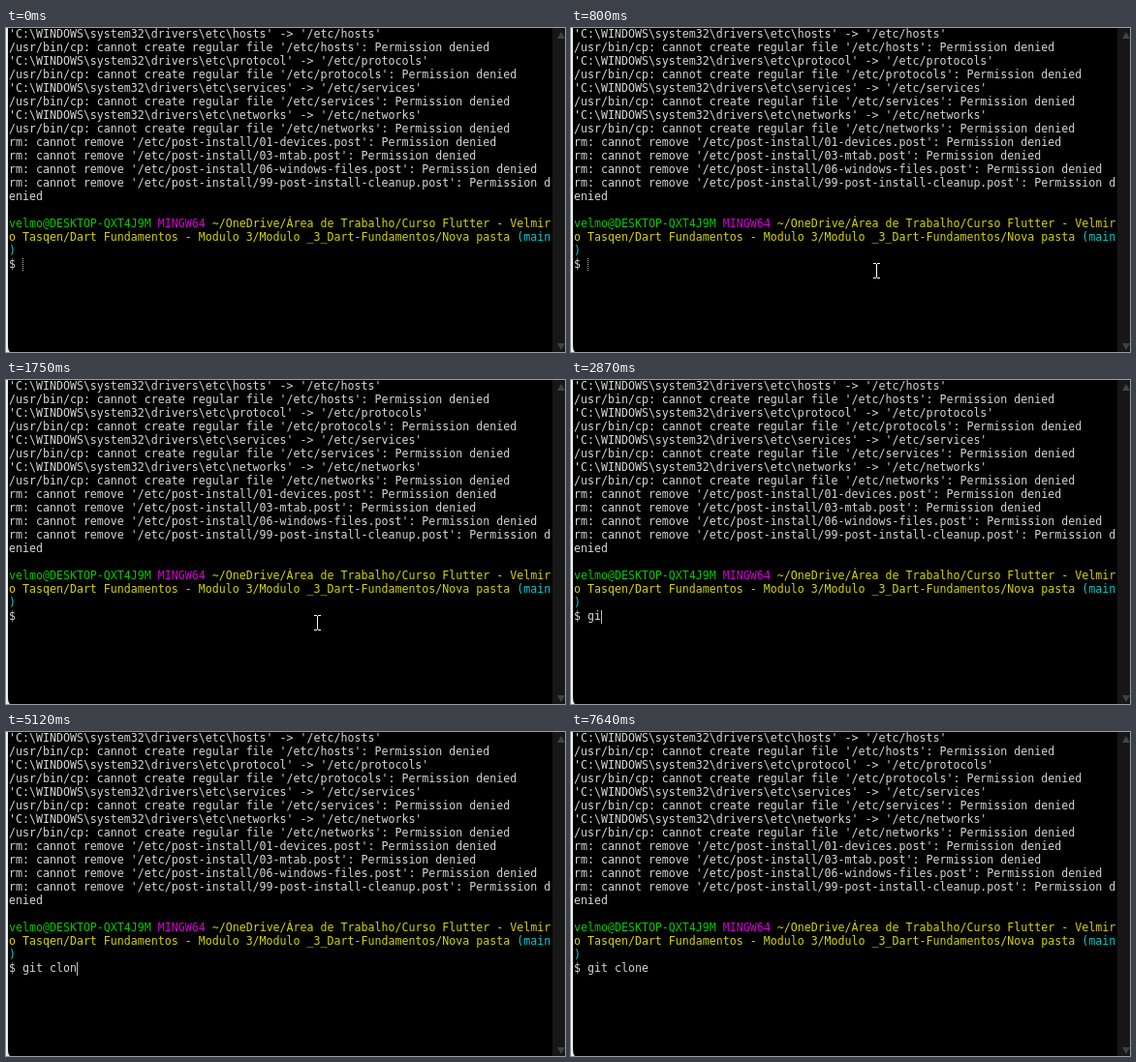
Animation, 577 px wide and 335 px high, one loop 8 s. Source, as an HTML page:

```html
<!DOCTYPE html>
<html lang="pt">
<head>
<meta charset="utf-8">
<title>Terminal</title>
<style>
  html, body { margin: 0; width: 100%; height: 100%; overflow: hidden; background: #000; }
  #stage { position: relative; width: 577px; height: 335px; overflow: hidden; background: #000; }
  pre {
    position: absolute; left: 3px; top: -1px; margin: 0; color: #d6d6d6;
    font: 11.627px/14px "DejaVu Sans Mono", monospace; font-variant-ligatures: none;
  }
  .user { color: #00cc00; }
  .system { color: #d400d4; }
  .path { color: #d4d400; }
  .branch { color: #00d0d0; }
  svg { position: absolute; left: 0; top: 0; }
</style>
</head>
<body>
<div id="stage">
<pre>
'C:\WINDOWS\system32\drivers\etc\hosts' -&gt; '/etc/hosts'
/usr/bin/cp: cannot create regular file '/etc/hosts': Permission denied
'C:\WINDOWS\system32\drivers\etc\protocol' -&gt; '/etc/protocols'
/usr/bin/cp: cannot create regular file '/etc/protocols': Permission denied
'C:\WINDOWS\system32\drivers\etc\services' -&gt; '/etc/services'
/usr/bin/cp: cannot create regular file '/etc/services': Permission denied
'C:\WINDOWS\system32\drivers\etc\networks' -&gt; '/etc/networks'
/usr/bin/cp: cannot create regular file '/etc/networks': Permission denied
rm: cannot remove '/etc/post-install/01-devices.post': Permission denied
rm: cannot remove '/etc/post-install/03-mtab.post': Permission denied
rm: cannot remove '/etc/post-install/06-windows-files.post': Permission denied
rm: cannot remove '/etc/post-install/99-post-install-cleanup.post': Permission d
enied

<span class="user">velmo@DESKTOP-QXT4J9M</span> <span class="system">MINGW64</span> <span class="path">~/OneDrive/Área de Trabalho/Curso Flutter - Velmir
o Tasqen/Dart Fundamentos - Modulo 3/Modulo _3_Dart-Fundamentos/Nova pasta</span> <span class="branch">(main
)</span>
$ <span id="typed"></span></pre>
<svg width="577" height="335" viewBox="0 0 577 335">
  <path d="M0 0H2V329Q2 333 4 335H0Z" fill="#eee"/>
  <rect x="564" width="13" height="335" fill="#171717"/>
  <path d="M569 11L573 4L577 11ZM569 326L573 333L577 326Z" fill="#3e443e"/>
  <path id="caret" d="M.5 238V252" stroke="#bfbfbf"/>
  <circle id="click" cx="313" cy="250" r="12" fill="#807800"/>
  <path id="pointer" d="M-3 -7.5H0M1 -7.5H4M-3 7.5H0M1 7.5H4M.5 -7V7" stroke="#fff"/>
</svg>
</div>
<script>
const LOOP = 8000;
const COMMAND = 'git clone ';
const keyTimes = [2340, 2870, 3130, 4190, 4450, 4590, 4790, 5120, 5250, 5590];
const caretOff = [[1750, 2270], [3660, 4120], [6580, 7130], [7640, LOOP]];
const moveTimes = [190, 260, 330, 390, 460, 530, 600, 670, 800];
const FOCUS = 1210, RELEASE = 1350;

const [typed, caret, click, pointer] =
  ['typed', 'caret', 'click', 'pointer'].map(id => document.getElementById(id));
const within = (t, from, to) => t >= from && t < to;
const show = (el, on) => el.setAttribute('visibility', on ? 'visible' : 'hidden');
const easeOut = (from, to, u, power) => to + (from - to) * (1 - u) ** power;

function pointerPosition(t) {
  if (t >= RELEASE) return [321, 251];
  const start = moveTimes[0], end = moveTimes.at(-1);
  const step = moveTimes.findLast(m => m <= t) ?? start;
  const u = (step - start) / (end - start);
  return [easeOut(359, 315, u, 1.2), easeOut(326, 251, u, 1.7)].map(Math.round);
}

function draw(t) {
  const count = keyTimes.filter(k => k <= t).length;
  typed.textContent = COMMAND.slice(0, count);

  // The caret is dotted until the window is clicked.
  caret.setAttribute('transform', `translate(${17 + 7 * count})`);
  caret.setAttribute('stroke-dasharray', t < FOCUS ? '1 1' : 'none');
  show(caret, !caretOff.some(([from, to]) => within(t, from, to)));

  show(click, within(t, FOCUS, RELEASE));
  show(pointer, within(t, moveTimes[0], keyTimes[0]));
  pointer.setAttribute('transform', `translate(${pointerPosition(t)})`);
}

const begin = performance.now();
function frame() {
  draw((performance.now() - begin) % LOOP);
  requestAnimationFrame(frame);
}
frame();
</script>
</body>
</html>
```
